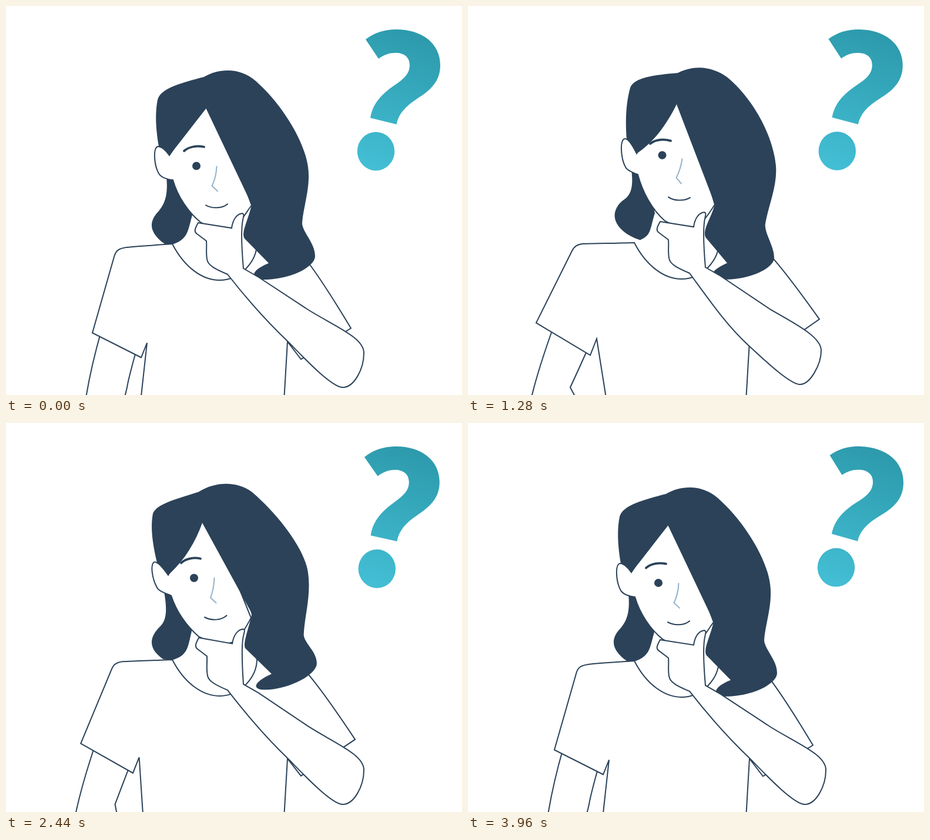
An HTML page for the animation above (4000 ms loop, 776 px wide and 664 px high).

```html
<!DOCTYPE html>
<html lang="en">
<head>
<meta charset="utf-8">
<title>Thinking</title>
<style>
  html, body { margin: 0; width: 100%; height: 100%; overflow: hidden; background: #fff; }
  svg { display: block; width: 776px; height: 664px; }
  .line { fill: #fff; stroke: #2b4259; stroke-width: 2; }
  .open { fill: none; stroke: #2b4259; stroke-width: 2; stroke-linecap: round; }
  .dark { fill: #2b4259; }
</style>
</head>
<body>
<svg viewBox="0 0 776 664">
  <defs>
    <linearGradient id="teal" gradientUnits="userSpaceOnUse" x1="705" y1="50" x2="625" y2="275">
      <stop offset="0" stop-color="#2d9aac"/>
      <stop offset="1" stop-color="#43bed4"/>
    </linearGradient>
  </defs>
  <path id="backHair" class="dark"/>
  <path id="sideArm" class="open"/>
  <path id="shirt" class="line"/>
  <g id="head">
    <path id="face" class="line"/>
    <path id="hair" class="dark"/>
    <g id="features">
      <path id="brow" class="open" style="stroke-width:3.8"/>
      <path id="nose" class="open" style="stroke:#92b2cb"/>
      <path id="mouth" class="open"/>
      <circle id="eye" class="dark" r="7"/>
    </g>
  </g>
  <path id="arm" class="line"/>
  <g id="question" fill="url(#teal)">
    <path d="M612 57C628 45 645 40 664 40C708 40 739 64 739 101C739 129 722 144 700 158C680 171 668 184 664.5 202L620 191C624 166 640 150 660 136C678 124 687 115 687 101C687 88 678 80 663 80C652 80 644 83 634 90Z"/>
    <ellipse cx="629.5" cy="248" rx="31.7" ry="33"/>
  </g>
</svg>
<script>
const el = id => document.getElementById(id);

// Each part has its resting outline plus variants with the same commands.
const backHair = {
  rest: 'M272 284C278 325 268 340 260 350C240 370 246 389 270 406L283 407C310 398 309 385 317 357L300 290Z',
  right: 'M277 274C284 316 274 326 264 333C240 352 244 382 290 400L293 401C312 392 309 385 318 355L305 290Z',
  left: 'M268 284C276 325 272 340 261 350C240 371 246 390 268 405L283 406C310 398 309 385 316 357L300 290Z'
};
const sideArm = {
  rest: 'M162 555C152 590 142 630 135 675M222 587C215 612 208 638 206 651L200 676',
  raised: 'M146 546C132 585 117 630 108 668M203 587C192 612 181 636 174 651L184 670'
};
const shirt = {
  rest: 'M283 406C255 408 225 410 205 412C192 414 187 417 184 428L147 558L230 600L240 575L229 675L473 675L479 573L502 603L587 550C530 455 500 415 480 400L427 405C427 435 400 468 363 468C335 468 304 447 283 406Z',
  raised: 'M283 406C255 407 225 407 195 408C186 409 181 412 177 420L116 541L208 596L219 568L236 675L473 675L479 573L502 602L598 535C540 455 505 412 480 395L427 405C427 435 400 468 363 468C335 468 304 447 283 406Z'
};
const face = {
  rest: 'M278 255C272 246 264 239 258 240C250 243 252 272 260 286C265 294 275 296 284 297C292 325 310 352 331 369C345 378 372 385 385 379C400 370 410 350 418 340L348 150Z',
  right: 'M287 256C281 244 272 229 266 231C258 235 260 266 269 281C274 287 282 289 289 292C297 322 313 352 335 371C350 380 374 386 387 381C402 373 413 354 420 343L363 148Z',
  left: 'M276 264C269 254 258 240 252 242C245 247 249 272 258 287C264 294 273 295 281 299C290 327 308 352 328 369C345 378 372 384 385 379C400 370 410 350 417 337L342 150Z'
};
const hair = {
  rest: 'M340.5 175C320 201 299 229 278 255C272 248 266 242 260 240C254 205 254 180 258 160C263 140 300 131 337 121C365 105 400 106 425 128C468 166 508 229 514 275C519 310 505 345 504 372C506 388 526 405 526 427C526 445 485 467 437 467C422 467 409 455 447 439L406 397C399 387 413 364 418 339C417 336 413 328 411 324Z',
  right: 'M355 172C338 207 315 238 287 256C281 246 275 234 270 232C267 195 270 165 276 144C282 126 318 122 357 118.5C388 103 418 109 440 126C480 160 515 220 521 275C525 310 508 350 505 378C506 395 521 415 521 434C521 452 480 471 437 471C420 471 399 462 441 443L405 400C397 389 414 366 420 343C419 340 416 332 414.5 328Z',
  left: 'M334 175C322 209 303 240 276 264C269 255 262 246 257 243C248 205 246 180 250 159C256 142 295 133 328 122C358 103 395 104 418 123C460 160 505 218 511 260C517 300 505 340 505 370C508 385 528 398 528 418C528 438 480 463 440 463C422 463 415 453 451 436L407 393C400 385 413 360 417 336C416 333 412 325 409.5 321Z',
  lifted: 'M340.5 175C320 201 299 229 278 255C272 248 266 242 260 240C254 205 254 180 258 160C263 140 300 131 337 121C365 105 400 106 425 128C468 166 508 229 514 273C519 308 507 338 506 365C508 381 528 398 528 420C528 438 485 460 437 460C422 460 411 448 449 432L408 390C402 384 414 350 420 331C421.5 328 421 325 419 322Z',
  puffed: 'M340.5 175C320 201 299 229 278 255C272 248 266 242 260 240C254 205 254 180 258 160C263 140 300 131 337 121C365 105 400 106 427 128C471 166 512 229 518 275C523 310 507 345 505 372C506 388 526 405 526 427C526 445 485 467 437 467C422 467 409 455 447 439L406 397C399 387 413 364 418 339C417 336 413 328 411 324Z'
};
const brow = {
  rest: 'M303 247.5C311 240 325 238 337 240.5',
  right: 'M310 244C319 236.5 333 235.5 345 239',
  left: 'M298 245.5C306 237.5 320 235.5 331 238'
};
const nose = {
  rest: 'M358.5 274C358 285 355 298 350.5 307L360 316',
  right: 'M364.5 270C363 280 359 293 354.5 302L363 312',
  left: 'M354.5 271C354 282 352 295 348 304.5L357.5 313.5'
};
const mouth = {
  rest: 'M340 340C350 346 368 346 377 338',
  right: 'M341 335C350 342 368 342 378 336',
  left: 'M338 338C349 344 366 344 375.5 335'
};
const arm = {
  rest: 'M327 370L384 379C386 364 393 355 402 354C407 355 403 361 402 372C400 390 402 425 404 448L430 463L515 519C560 547 609 566 609 592C609 620 592 652 572 651C550 648 500 593 479 572C437 532 402 490 377 458C358 450 343 443 342 432C340 420 342 412 341 401L325 389C319 385 322 379 327 370Z',
  pushed: 'M332 364L389 378C391 364 399 354 408 353C415 353 407 362 406 372C403 390 404 425 404 448L430 463L515 519C560 547 609 566 609 592C609 620 592 652 572 651C550 648 500 593 479 572C437 532 402 490 377 458C358 450 346 443 345 432C343 420 345 410 345 397L330 385C324 380 327 374 332 364Z',
  tucked: 'M327 370L384 379C386 364 393 355 402 354C407 355 403 361 402 372C400 390 402 425 404 448L430 463L515 519C555 542 601 564 601 588C601 612 582 647 564 646C545 644 500 600 478 580C440 545 412 505 377 458C358 450 343 443 342 432C340 420 342 412 341 401L325 389C319 385 322 379 327 370Z'
};

const NUMBER = /[\d.]+/g;
const numbers = d => d.match(NUMBER).map(Number);

// Adds weighted variants to the resting outline, then shifts y by lift(y).
function blend(shape, weights, lift = () => 0) {
  const base = numbers(shape.rest), out = base.slice();
  for (const name in weights) {
    if (!shape[name]) continue;
    numbers(shape[name]).forEach((n, i) => out[i] += weights[name] * (n - base[i]));
  }
  let i = 0;
  return shape.rest.replace(NUMBER, () => {
    const n = out[i];
    return (i++ % 2 ? n + lift(n) : n).toFixed(2) + ' ';
  });
}

// Smooth curve without overshoot through time, value, time, value ...
function track(...keys) {
  const T = keys.filter((_, i) => i % 2 === 0), V = keys.filter((_, i) => i % 2);
  const rise = T.slice(1).map((x, i) => (V[i + 1] - V[i]) / (x - T[i]));
  const slope = T.map((_, i) => {
    const a = rise[i - 1] || 0, b = rise[i] || 0;
    return a * b > 0 ? 2 * a * b / (a + b) : 0;
  });
  return t => {
    if (t <= T[0]) return V[0];
    const i = T.findIndex(x => x > t) - 1;
    if (i < 0) return V[V.length - 1];
    const w = T[i + 1] - T[i], p = (t - T[i]) / w, q = 1 - p;
    return q * q * (1 + 2 * p) * V[i] + p * p * (3 - 2 * p) * V[i + 1]
      + w * p * q * (q * slope[i] - p * slope[i + 1]);
  };
}

const breath = track(0, 0, 120, .15, 640, .95, 820, 1, 1280, .69, 1480, .6, 1960, .02, 2000, 0);
const raised = track(0, 0, 560, 1, 2120, 1, 2910, 0);
const leanRight = track(0, 0, 600, 1, 1340, 1, 2040, 0);
const leanLeft = track(1340, 0, 2040, 1, 2820, 1, 3440, 0);
const lifted = track(0, 0, 640, 1, 1280, 0, 2120, 0, 2800, 1, 3480, .15, 4000, 0);
const pushed = track(0, 0, 640, 1, 1280, 0, 2120, 0, 2800, .5, 3480, .4, 4000, 0);
const gaze = track(640, 0, 1280, -4.6, 2120, -4, 2800, 0);
const tiltStart = track(0, 0, 300, -.5, 600, 0);
const tilt = track(600, 2, 1120, 1, 1280, .8, 1700, -1.6, 2200, -1.7, 2800, .1, 3360, .9, 3480, 1.9, 4000, 2);
const swell = track(600, 1.016, 1120, 1);

function draw(t) {
  const b = breath(t % 2000);
  const right = leanRight(t), left = leanLeft(t), pose = { right, left };
  const chest = y => -2.9 * b * Math.min(1, Math.max(0, (550 - y) / 80));
  const set = (id, d) => el(id).setAttribute('d', d);
  const move = (id, value) => el(id).setAttribute('transform', value);

  set('backHair', blend(backHair, pose, () => -2 * b));
  set('sideArm', blend(sideArm, { raised: raised(t) }));
  set('shirt', blend(shirt, { raised: raised(t) }, chest));
  set('face', blend(face, pose));
  set('hair', blend(hair, { ...pose, lifted: lifted(t), puffed: b }));
  set('brow', blend(brow, pose));
  set('nose', blend(nose, pose));
  set('mouth', blend(mouth, pose));
  set('arm', blend(arm, { pushed: pushed(t), tucked: right }, chest));
  el('eye').setAttribute('cx', 324 + 6.5 * right - 4 * left);
  el('eye').setAttribute('cy', 273 - 9.5 * right - 2 * left);
  move('head', `translate(0 ${-6.2 * b})`);
  move('features', `translate(0 ${gaze(t)})`);

  const early = t < 600;
  move('question', `translate(668 160) rotate(${early ? tiltStart(t) : tilt(t)}) scale(${early ? 1 : swell(t)}) translate(-668 -160)`);
}

function tick() {
  draw(performance.now() % 4000);
  requestAnimationFrame(tick);
}
tick();
</script>
</body>
</html>
```
